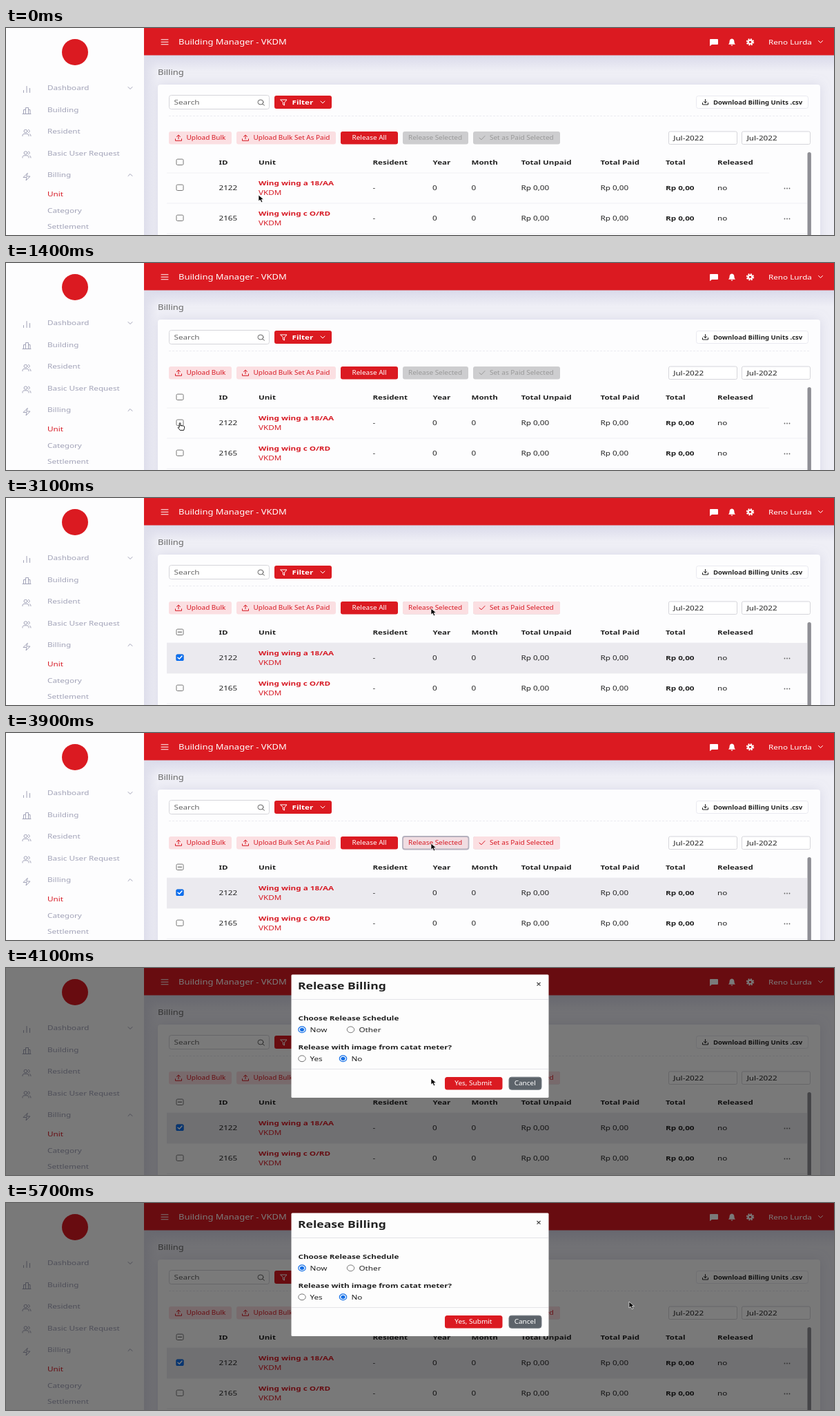
An HTML page that plays this animation: 1200 by 300 pixels, repeating every 5.8 s.

```html
<!DOCTYPE html>
<html lang="en">
<head>
<meta charset="utf-8">
<title>Release billing</title>
<style>
html, body { margin: 0; width: 100%; height: 100%; overflow: hidden; background: #efeff6; }
svg { display: block; }
text {
  font: 9.6px "Noto Sans", "Open Sans", sans-serif;
  fill: #222;
  transform-box: fill-box;
  transform-origin: 0 0;
  transform: scaleX(1.22);
  white-space: pre;
}
.nav text { fill: #a2a3b8; }
.nav text.on, .red text, text.red { fill: #d71a24; }
.btn text { font-size: 8.2px; }
.off text { fill: #999; }
.white text, text.white { fill: #fff; }
.head text { font-size: 9.5px; font-weight: 700; }
text.b { font-weight: 700; }
text.big { font-size: 10.65px; }
.line { fill: none; stroke-linecap: round; stroke-linejoin: round; }
.box { fill: #fff; stroke: #767676; }
.field { fill: #fff; stroke: #d5d5da; }

.checked, .focus, .shade, .modal, .cursor, .arrow, .hand {
  animation: 5.8s -8ms step-end infinite;
}
.checked { animation-name: checked; }
.focus { animation-name: focus; }
.shade { animation-name: shade; }
.modal { animation-name: modal; }
.cursor { animation-name: move; }
.arrow { animation-name: arrow; }
.hand { animation-name: hand; }

@keyframes checked { 0% { opacity: 0 } 27.586%, 100% { opacity: 1 } }
@keyframes focus { 0% { opacity: 0 } 63.793% { opacity: 1 } 68.966%, 100% { opacity: 0 } }
@keyframes shade { 0% { opacity: 0 } 68.966% { opacity: .36 } 70.69%, 100% { opacity: .52 } }
@keyframes modal {
  0% { opacity: 0; transform: translateY(-29px) }
  68.966% { opacity: .64; transform: translateY(-16.5px) }
  70.69% { opacity: 1; transform: translateY(-5px) }
  72.414%, 100% { opacity: 1; transform: none }
}
@keyframes move {
  0% { transform: translate(366px, 242px) }
  8.621% { transform: translate(366px, 242px); animation-timing-function: steps(5) }
  17.241% { transform: translate(252px, 231px) }
  31.034% { transform: translate(252px, 231px); animation-timing-function: steps(4) }
  37.931% { transform: translate(450px, 203px); animation-timing-function: steps(6) }
  48.276% { transform: translate(616px, 160px) }
  79.31% { transform: translate(616px, 160px); animation-timing-function: steps(7) }
  91.379%, 100% { transform: translate(903px, 143px) }
}
@keyframes arrow { 0% { opacity: 1 } 17.241% { opacity: 0 } 32.759%, 100% { opacity: 1 } }
@keyframes hand { 0% { opacity: 0 } 17.241% { opacity: 1 } 32.759%, 100% { opacity: 0 } }
</style>
</head>
<body>
<svg width="1200" height="300" viewBox="0 0 1200 300">
  <defs>
    <linearGradient id="fall" x2="0" y2="1">
      <stop stop-color="#d9d9ea"/><stop offset="1" stop-color="#efeff6"/>
    </linearGradient>
    <linearGradient id="side">
      <stop stop-color="#dedeeb"/><stop offset="1" stop-color="#dedeeb" stop-opacity="0"/>
    </linearGradient>
    <filter id="soft" x="-5%" y="-20%" width="110%" height="140%">
      <feDropShadow dx="0" dy="0" stdDeviation="8" flood-color="#9c9cc0" flood-opacity=".28"/>
    </filter>
    <path id="down" class="line" d="M-3-1.5 0 1.5 3-1.5"/>
    <path id="up" class="line" d="M-3 1.5 0-1.5 3 1.5"/>
    <path id="upload" class="line" d="M-4.5 1.5v2.5h9V1.5M0 1.5V-4M-2.5-1.8 0-4.2 2.5-1.8"/>
    <path id="tick" class="line" d="M-4 0-1 2.5 4-2.8"/>
    <rect id="check" class="box" x="-5" y="-4.2" width="10" height="8.4" rx="1.6"/>
    <ellipse id="radio" class="box" rx="5.2" ry="4.4"/>
    <g id="picked">
      <ellipse rx="5.2" ry="4.4" fill="#fff" stroke="#1670e6" stroke-width="1.2"/>
      <ellipse rx="3.1" ry="2.6" fill="#1670e6"/>
    </g>
    <g id="people" class="line">
      <ellipse cx="-1.5" cy="-2.5" rx="2.5" ry="2.2"/>
      <path d="M-6 4.5V3Q-5.5 1.3-3 1.3H0Q2.5 1.3 3 3V4.5M2.5-4.6Q4.5-4 4.3-2.3 4-.8 2.5-.4M4.5 1.5Q6 2 6 4.5"/>
    </g>
    <g id="dots" fill="#666">
      <circle cx="-3.5" r=".9"/><circle r=".9"/><circle cx="3.5" r=".9"/>
    </g>
  </defs>

  <rect width="1200" height="300" fill="#efeff6"/>
  <rect x="200" y="39" width="1000" height="24" fill="url(#fall)"/>
  <rect x="220" y="82" width="960" height="240" rx="4" fill="#fdfdfe" filter="url(#soft)"/>
  <rect x="200" y="39" width="20" height="261" fill="url(#side)"/>

  <!-- top bar -->
  <rect x="200" width="1000" height="39.5" fill="#db1a21"/>
  <path class="line" d="M225 16.8h10M225 20.3h10M225 23.8h10" stroke="#fff"/>
  <g class="white">
    <text class="big" x="250" y="24">Building Manager - VKDM</text>
    <text x="1105" y="23.6">Reno Lurda</text>
  </g>
  <g fill="#fff">
    <path d="M1021 16h10q1 0 1 1v6q0 1-1 1h-8l-3 2.2V17q0-1 1-1z"/>
    <path d="M1052 15.5q3.4.6 3.4 4 0 3 1.6 4.3h-10q1.6-1.3 1.6-4.3 0-3.4 3.4-4zM1050.5 24.5h3q-.3 1.3-1.5 1.3t-1.5-1.3z"/>
  </g>
  <g fill="none" stroke="#fff" stroke-width="2">
    <ellipse cx="1078.5" cy="20.3" rx="4.7" ry="4.1" stroke-dasharray="2 1.45"/>
    <ellipse cx="1078.5" cy="20.3" rx="2.9" ry="2.5"/>
  </g>
  <use href="#down" x="1180.5" y="20" stroke="#fff"/>

  <!-- sidebar -->
  <rect width="200" height="300" fill="#fdfdfe"/>
  <circle cx="100" cy="35" r="19" fill="#db1a21"/>
  <g class="nav">
    <text x="60" y="90.3">Dashboard</text>
    <text x="60" y="122">Building</text>
    <text x="60" y="153.5">Resident</text>
    <text x="60" y="185">Basic User Request</text>
    <text x="60" y="216.5">Billing</text>
    <text class="on" x="60" y="244">Unit</text>
    <text x="60" y="267.8">Category</text>
    <text x="60" y="291.2">Settlement</text>
  </g>
  <g stroke="#a2a3b8" class="line">
    <path d="M25.5 93.5v-3M30 93.5v-9M34.5 93.5v-6"/>
    <path d="M24 124.5h12M25.5 124.5v-6h3M28.5 124.5v-9h4v9M32.5 118.5h2.5v6"/>
    <use href="#people" x="30" y="152"/>
    <use href="#people" x="30" y="183.5"/>
    <path d="M31 210.5l-6 6h5l-1 4.5 6-6h-5z"/>
    <use href="#down" x="180" y="87"/>
    <use href="#up" x="180" y="213"/>
  </g>

  <!-- toolbar -->
  <text class="big" x="220" y="68" style="fill:#666">Billing</text>
  <rect class="field" x="236.5" y="97.5" width="145" height="20" rx="3"/>
  <text x="243.5" y="111.3" style="fill:#666">Search</text>
  <g class="line" stroke="#666"><ellipse cx="369" cy="107.5" rx="4" ry="3.5"/><path d="M372 110.2l2.5 2"/></g>
  <rect x="389" y="98" width="83" height="19" rx="3" fill="#db1a21"/>
  <g class="line" stroke="#fff">
    <path d="M398 104h9l-3.5 4v4l-2-1v-3z"/>
    <use href="#down" x="459" y="107.5"/>
  </g>
  <text class="b white" x="414.5" y="111.2">Filter</text>
  <rect x="1000.5" y="98.5" width="162" height="18" rx="3" fill="#fff" stroke="#e9e9f0"/>
  <path class="line" stroke="#222" d="M1009.5 108.5v2.5h8v-2.5M1013.5 103.5v5M1011.3 106.6l2.2 2 2.2-2"/>
  <text x="1025" y="110.6" style="font-size:7.87px;font-weight:600">Download Billing Units .csv</text>
  <path d="M236 127.5H1166" stroke="#ebebf1" stroke-dasharray="3 2"/>

  <g class="btn">
    <g class="red">
      <rect x="236" y="150" width="91" height="18.5" rx="3" fill="#fbdfe2"/>
      <text x="261.5" y="162.3">Upload Bulk</text>
      <rect x="334" y="150" width="144" height="18.5" rx="3" fill="#fbdfe2"/>
      <text x="358.5" y="162.3">Upload Bulk Set As Paid</text>
      <use href="#upload" x="250" y="159.3" stroke="#d71a24"/>
      <use href="#upload" x="347" y="159.3" stroke="#d71a24"/>
    </g>
    <rect x="485" y="150" width="83" height="18.5" rx="3" fill="#db1a21"/>
    <text class="white" x="501.5" y="162.3">Release All</text>
    <g class="off">
      <rect x="575" y="150" width="95" height="18.5" rx="3" fill="#cdcdcf"/>
      <rect x="677" y="150" width="126" height="18.5" rx="3" fill="#cdcdcf"/>
      <text x="583" y="162.3">Release Selected</text>
      <text x="701" y="162.3">Set as Paid Selected</text>
      <use href="#tick" x="690" y="159.3" stroke="#999"/>
    </g>
    <g class="checked red">
      <rect x="575" y="150" width="95" height="18.5" rx="3" fill="#fbdfe2"/>
      <rect x="677" y="150" width="126" height="18.5" rx="3" fill="#fbdfe2"/>
      <rect class="focus" x="575" y="150" width="95.5" height="18.5" rx="3" fill="#f1dde2" stroke="#b4b0bd" stroke-width="1.8"/>
      <text x="583" y="162.3">Release Selected</text>
      <text x="701" y="162.3">Set as Paid Selected</text>
      <use href="#tick" x="690" y="159.3" stroke="#d71a24"/>
    </g>
  </g>
  <rect class="field" x="960.5" y="150" width="99" height="18.5" rx="2"/>
  <rect class="field" x="1066.5" y="150" width="99" height="18.5" rx="2"/>
  <text x="967" y="162.9">Jul-2022</text>
  <text x="1073.5" y="162.9">Jul-2022</text>

  <!-- table -->
  <path d="M233 210H1106M233 254H1161M233 298H1161" stroke="#f0f0f4"/>
  <rect class="checked" x="233" y="210" width="928" height="44" fill="#ebeaef"/>
  <path d="M1161.5 300V182.5q0-2.5 2.7-2.5t2.7 2.5V300z" fill="#8f8f95"/>
  <g class="head">
    <text x="308.5" y="198.3">ID</text>
    <text x="366" y="198.3">Unit</text>
    <text x="531.5" y="198.3">Resident</text>
    <text x="618.5" y="198.3">Year</text>
    <text x="674.5" y="198.3">Month</text>
    <text x="746.5" y="198.3">Total Unpaid</text>
    <text x="861.5" y="198.3">Total Paid</text>
    <text x="956" y="198.3">Total</text>
    <text x="1031" y="198.3">Released</text>
  </g>
  <g id="cells">
    <text x="531.5" y="235.5">-</text>
    <text x="618" y="235.5">0</text>
    <text x="674.5" y="235.5">0</text>
    <text x="746.5" y="235.5">Rp 0,00</text>
    <text x="861.5" y="235.5">Rp 0,00</text>
    <text class="b" x="956" y="235.5">Rp 0,00</text>
    <text x="1031" y="235.5">no</text>
    <text class="red" x="366" y="242.4">VKDM</text>
    <use href="#dots" x="1132" y="232.5"/>
    <use href="#check" x="252" y="231.3"/>
  </g>
  <use href="#cells" y="44"/>
  <text x="308.5" y="235.5">2122</text>
  <text x="308.5" y="279.5">2165</text>
  <text class="b red" x="366" y="228.5">Wing wing a 18/AA</text>
  <text class="b red" x="366" y="272.5">Wing wing c O/RD</text>
  <use href="#check" x="252" y="194.3"/>
  <g class="checked">
    <path d="M249 194.3h6" stroke="#767676" stroke-width="1.3"/>
    <rect x="246.5" y="226.6" width="11" height="9.4" rx="1.6" fill="#0b6ff0"/>
    <path class="line" d="M249 231.3l2.2 2 3.8-4.2" stroke="#fff" stroke-width="1.5"/>
  </g>

  <!-- dialog -->
  <rect class="shade" width="1200" height="300"/>
  <g class="modal">
    <rect x="413.5" y="14.5" width="373" height="178.5" rx="1.5" fill="#fdfdfd"/>
    <path d="M414 50.5H786M414 151.5H786" stroke="#e4e4e8"/>
    <text x="423" y="35.8" style="font-size:14.4px;font-weight:600">Release Billing</text>
    <path d="M769.5 26l5 4.6M774.5 26l-5 4.6" stroke="#444" stroke-width="1.2"/>
    <text class="b" x="423.5" y="81.5">Choose Release Schedule</text>
    <text x="440.5" y="97.8">Now</text>
    <text x="511.5" y="97.8">Other</text>
    <text class="b" x="423.5" y="123.5">Release with image from catat meter?</text>
    <text x="440.5" y="139.8">Yes</text>
    <text x="500.5" y="139.8">No</text>
    <use href="#picked" x="429" y="94.3"/>
    <use href="#radio" x="499.5" y="94.3"/>
    <use href="#radio" x="429" y="136.3"/>
    <use href="#picked" x="488.5" y="136.3"/>
    <g class="btn white">
      <rect x="636" y="163" width="83.5" height="18.5" rx="3.5" fill="#db1a21"/>
      <rect x="729" y="163.2" width="47" height="18.1" rx="3.5" fill="#5c636a" stroke="#757c83"/>
      <text x="650.3" y="175.3">Yes, Submit</text>
      <text x="736.7" y="175.3">Cancel</text>
    </g>
  </g>

  <!-- pointer -->
  <g class="cursor" stroke-linejoin="round">
    <path class="arrow" d="M0 0V9L2.3 7.1 4 10.8 5.8 10.1 4.2 6.5H7.4z" fill="#000" stroke="#fff" stroke-width=".7"/>
    <path class="hand" d="M-.8 1.2Q0 .1 1 1.2V5Q1.9 4.1 2.9 5 3.8 4.3 4.7 5.3 5.7 4.7 6.6 5.9V8.3L5.6 11.4H.3L-2.7 7.7Q-2.8 6.4-.8 7.1z" fill="#fff" stroke="#000" stroke-width=".9"/>
  </g>
</svg>
</body>
</html>
```
